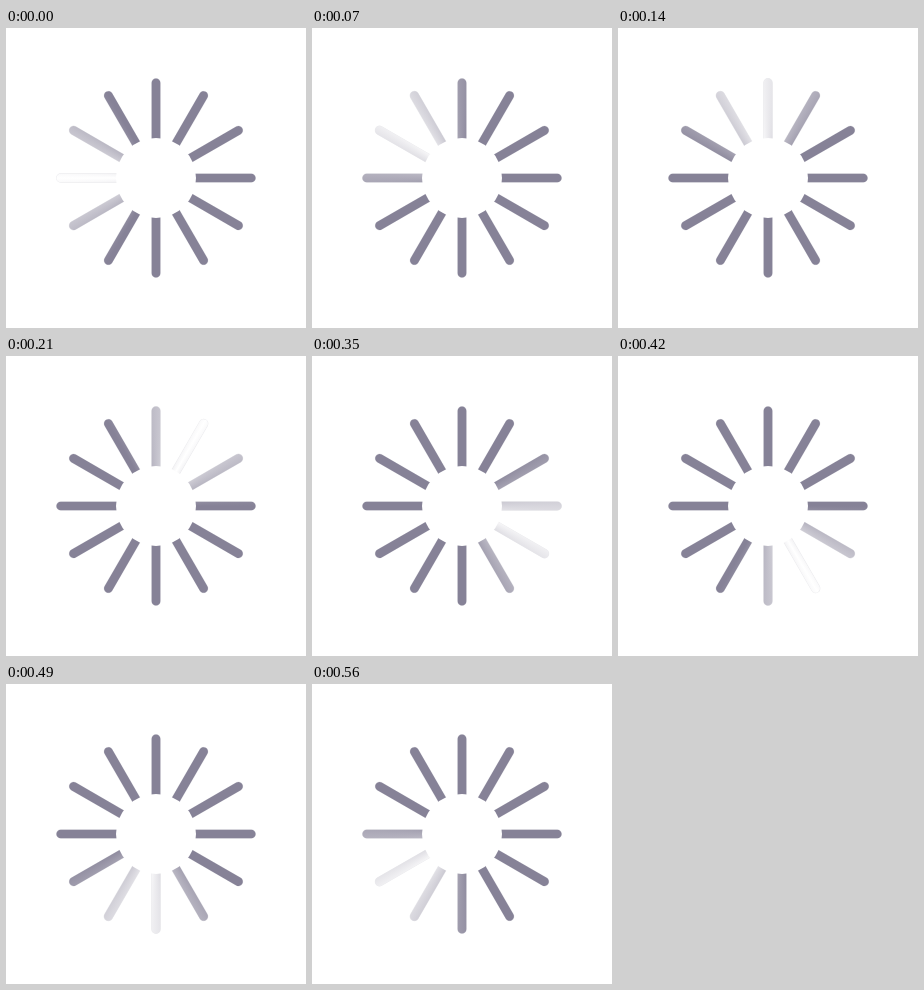
An HTML page with a canvas for the animation above (630 ms loop, 300 by 300 pixels).

```html
<!DOCTYPE html>
<html lang="en">
<head>
<meta charset="utf-8">
<title>Spinner</title>
<style>
  html, body { margin: 0; width: 100%; height: 100%; overflow: hidden; background: #fff; }
  canvas { display: block; }
</style>
</head>
<body>
<canvas id="stage" width="300" height="300"></canvas>
<script>
const ctx = document.getElementById('stage').getContext('2d');
const CENTER = 150, INNER = 40, OUTER = 100, WIDTH = 9.5;
const SPOKES = 12, STEPS = 9, STEP_MS = 70;
const TURN = Math.PI * 2;

const spokes = new Path2D();
for (let i = 0; i < SPOKES; i++) {
  const x = Math.cos(i / SPOKES * TURN), y = Math.sin(i / SPOKES * TURN);
  const tip = OUTER - WIDTH / 2;
  spokes.moveTo(CENTER + x * (INNER - 5), CENTER + y * (INNER - 5));
  spokes.lineTo(CENTER + x * tip, CENTER + y * tip);
}

// A white highlight that fades to the base colour 60 degrees to either side.
function sweep(angle) {
  const gradient = ctx.createConicGradient(angle, CENTER, CENTER);
  gradient.addColorStop(0, '#fff');
  gradient.addColorStop(1 / 6, '#868297');
  gradient.addColorStop(5 / 6, '#868297');
  gradient.addColorStop(1, '#fff');
  return gradient;
}

function strokeSpokes(style, width) {
  ctx.strokeStyle = style;
  ctx.lineWidth = width;
  ctx.stroke(spokes);
}

function draw(now) {
  const step = Math.floor(now / STEP_MS) % STEPS;
  ctx.fillStyle = '#fff';
  ctx.fillRect(0, 0, 300, 300);
  ctx.lineCap = 'round';
  strokeSpokes('#e9e9ec', WIDTH);
  strokeSpokes(sweep(TURN / 2 + step / STEPS * TURN), WIDTH - 0.8);
  ctx.beginPath();
  ctx.arc(CENTER, CENTER, INNER, 0, TURN);
  ctx.fill();
  requestAnimationFrame(draw);
}
requestAnimationFrame(draw);
</script>
</body>
</html>
```
